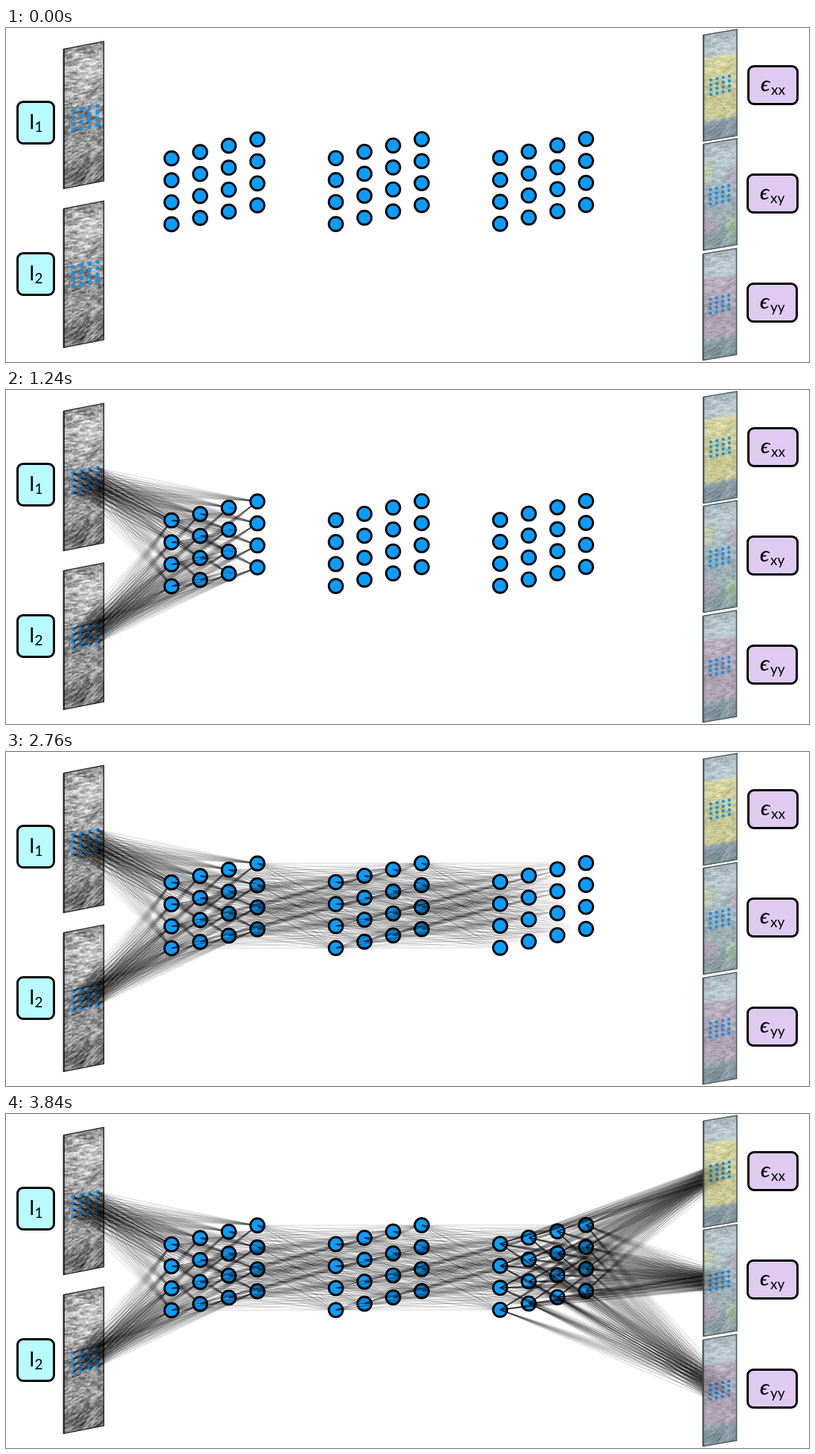
Recreate the animation shown at these times as an HTML page with a canvas. Size 1080 by 450 pixels, loop 3.88 s.

```html
<!DOCTYPE html>
<html lang="en">
<head>
<meta charset="utf-8">
<title>Strain network</title>
<style>
  html, body { margin: 0; width: 100%; height: 100%; overflow: hidden; background: #fff; }
  canvas, svg { position: absolute; left: 0; top: 0; width: 1080px; height: 450px; }
  rect { stroke: #000; stroke-width: 3; }
  .in { fill: #b8fbff; }
  .out { fill: #dfcbf2; }
  text { font-family: Lato, "Open Sans", sans-serif; fill: #000; }
  .big { font-size: 27px; }
  .sub { font-size: 19px; }
  .eps { font: italic 30px "Liberation Serif", "Noto Serif", "DejaVu Serif", serif; stroke: #000; stroke-width: .4; }
</style>
</head>
<body>
<canvas id="stage" width="1080" height="450"></canvas>
<svg id="labels" viewBox="0 0 1080 450"></svg>
<script>
const W = 1080, H = 450, LOOP = 3880, STEP = 40, PART = LOOP / 4, SOFT = 40;
const ctx = document.getElementById('stage').getContext('2d');

// Labels
function label(x, y, w, h, kind, parts) {
  const text = parts.map(([cls, dx, dy, s]) =>
    `<text class="${cls}" x="${x + dx}" y="${y + dy}">${s}</text>`).join('');
  return `<rect class="${kind}" x="${x}" y="${y}" width="${w}" height="${h}" rx="7.5"/>${text}`;
}
const inLabel = (y, n) => label(15.5, y, 49, 56, 'in', [['big', 15.5, 36.5, 'I'], ['sub', 23, 40.5, n]]);
const outLabel = (x, y, w, s) => label(x, y, w, 51, 'out', [['eps', 16.5, 33.5, 'ϵ'], ['sub', 30.5, 38, s]]);
document.getElementById('labels').innerHTML =
  inLabel(99.5, 1) + inLabel(303.5, 2) +
  outLabel(998.5, 51.5, 66, 'xx') + outLabel(997.5, 197.5, 67, 'xy') + outLabel(997.5, 344.5, 66, 'yy');

// 4 x 4 grid of points, column by column
function grid(x, y, dx, dy, slope) {
  const pts = [];
  for (let c = 0; c < 4; c++)
    for (let r = 0; r < 4; r++) pts.push({ x: x + c * dx, y: y + c * slope + r * dy });
  return pts;
}
const inputs = [grid(90.5, 112, 10.9, 8.6, -2.3), grid(90.5, 322, 10.9, 8.6, -2.3)];
const layers = [0, 1, 2].map(i => grid(222.6 + 221 * i, 175.6 - .3 * i, 38.5, 29.6, -8.5));
const outputs = [grid(948, 70, 8.3, 6.5, -1.7), grid(947.3, 217.8, 8.3, 6.5, -1.8), grid(947.3, 365.5, 8.3, 6.3, -1.8)];

// Seeded smooth noise
function hash(x, y, seed) {
  let h = Math.imul(x, 374761393) ^ Math.imul(y, 668265263) ^ Math.imul(seed, 974634721);
  h = Math.imul(h ^ (h >>> 13), 1274126177);
  return ((h ^ (h >>> 16)) >>> 0) / 4294967295;
}
function noise(x, y, seed) {
  const i = Math.floor(x), j = Math.floor(y);
  const ease = t => t * t * (3 - 2 * t), u = ease(x - i), v = ease(y - j);
  const mix = (a, b, t) => a + (b - a) * t;
  return mix(mix(hash(i, j, seed), hash(i + 1, j, seed), u),
             mix(hash(i, j + 1, seed), hash(i + 1, j + 1, seed), u), v);
}

// Layered tissue: brightness from top to bottom, streaks, fine grain
const tone = [145, 168, 182, 172, 176, 165, 140, 142, 135, 148, 150, 122, 118, 125];
function tissue(u, v, seed) {
  const p = v * (tone.length - 1), k = Math.min(Math.floor(p), tone.length - 2);
  const base = tone[k] + (tone[k + 1] - tone[k]) * (p - k);
  const x = u * 54, y = v * 190 + 3 * Math.sin(u * 4 + v * 9) + (v > .75 ? x * .6 : 0);
  return base + 95 * (noise(x / 8, y / 1.9, seed) - .5)
              + 95 * (noise(x / 2.4, y / 1.2, seed + 1) - .5)
              + 35 * (noise(x / 22, y / 8, seed + 2) - .5);
}

const teal = [168, 184, 190];
const deep = [142, 161, 168];
const blend = (a, b, t) => a.map((c, i) => c + (b[i] - c) * t);
const ramp = (a, b, v) => Math.max(0, Math.min(1, (v - a) / (b - a)));
const blob = (u, v, cu, cv) => Math.exp(-((u - cu) ** 2) / .06 - ((v - cv) ** 2) / .008);
const band = (col, a, b) => (u, v) =>
  blend(blend(teal, deep, ramp(.75, .9, v)), col, ramp(a, a + .03, v) * (1 - ramp(b, b + .03, v)));
function patches(u, v) {
  let c = blend(teal, deep, v * .6);
  c = blend(c, [196, 206, 140], .8 * blob(u, v, 0, .27));
  c = blend(c, [188, 152, 180], .7 * blob(u, v, 1, .35));
  c = blend(c, [185, 148, 176], .7 * blob(u, v, .1, .78));
  return blend(c, [158, 198, 142], .7 * blob(u, v, .9, .82));
}

function panel(g, x, y, w, h, rise, seed, tint) {
  const tile = document.createElement('canvas');
  tile.width = w; tile.height = h;
  const tg = tile.getContext('2d'), img = tg.createImageData(w, h);
  for (let j = 0; j < h; j++) for (let i = 0; i < w; i++) {
    const u = i / w, v = j / h, t = tissue(u, v, seed);
    const col = tint ? tint(u, v).map(c => c + (t - 150) * .4) : [t, t, t];
    img.data.set([...col, 255], (j * w + i) * 4);
  }
  tg.putImageData(img, 0, 0);
  g.save();
  g.transform(1, -rise / w, 0, 1, x, y);
  g.drawImage(tile, 0, 0);
  g.strokeStyle = tint ? '#4d565a' : '#1c1c1c';
  g.lineWidth = 1.4;
  g.strokeRect(0, 0, w, h);
  g.fillStyle = g.strokeStyle;
  g.fillRect(-.7, 0, 2, h);
  g.restore();
}

function dots(g, pts, r, line, edge) {
  g.fillStyle = '#0a9dff';
  g.strokeStyle = edge;
  g.lineWidth = line;
  for (const p of pts) {
    g.beginPath();
    g.arc(p.x, p.y, r, 0, 7);
    g.fill();
    g.stroke();
  }
}

function sheet() {
  const c = document.createElement('canvas');
  c.width = W; c.height = H;
  return c;
}

// Output panels veil the lines that run behind them
const veil = sheet(), vg = veil.getContext('2d');
panel(vg, 938, 9.5, 45, 143, 7.5, 3, band([200, 200, 148], .2, .8));
panel(vg, 938, 156.5, 45, 143, 7.5, 3, patches);
panel(vg, 937.5, 304.5, 45, 143, 7.5, 3, band([174, 163, 178], .22, .8));
outputs.forEach(pts => dots(vg, pts, 1.8, .6, '#0878d0'));

const base = sheet(), bg = base.getContext('2d');
bg.fillStyle = '#fff';
bg.fillRect(0, 0, W, H);
panel(bg, 77.5, 28.5, 54, 188, 10.5, 3, null);
panel(bg, 77.5, 243.5, 54, 187, 10.5, 3, null);
inputs.forEach(pts => dots(bg, pts, 2.4, .7, '#0878d0'));
bg.drawImage(veil, 0, 0);

// Each bundle meets at one dot and is wiped in from left to right
const bundle = (from, to) => {
  const xs = [...from, ...to].map(p => p.x);
  return { from, to, x0: Math.min(...xs), x1: Math.max(...xs) };
};
const fanIn = (from, layer) => layer.map(dot => bundle(from, [dot]));
const fanOut = (layer, to) => layer.map(dot => bundle([dot], to));
const parts = [
  inputs.flatMap(pts => fanIn(pts, layers[0])),
  fanIn(layers[0], layers[1]),
  fanIn(layers[1], layers[2]),
  outputs.flatMap(pts => fanOut(layers[2], pts))
];
const INK = 'rgba(0,0,0,.34)';

function drawBundle(b, p) {
  const lead = b.x0 + p * (b.x1 - b.x0 + SOFT);
  if (p < 1) {
    const fade = ctx.createLinearGradient(lead - SOFT, 0, lead, 0);
    fade.addColorStop(0, INK);
    fade.addColorStop(1, 'rgba(0,0,0,0)');
    ctx.strokeStyle = fade;
  } else ctx.strokeStyle = INK;
  for (const s of b.from) for (const e of b.to) {
    ctx.beginPath();
    ctx.moveTo(s.x, s.y);
    ctx.lineTo(e.x, e.y);
    ctx.stroke();
  }
}

function draw(t) {
  ctx.drawImage(base, 0, 0);
  parts.forEach((part, i) => {
    const p = Math.min(1, t / PART - i);
    ctx.lineWidth = .5;
    if (p > 0) part.forEach(b => drawBundle(b, p));
    if (layers[i]) dots(ctx, layers[i], 9.4, 2.9, '#000');
  });
  ctx.globalAlpha = .75;
  ctx.drawImage(veil, 0, 0);
  ctx.globalAlpha = 1;
}

let shown = -1;
function tick(now) {
  const t = Math.floor((now % LOOP) / STEP) * STEP;
  if (t !== shown) draw(shown = t);
  requestAnimationFrame(tick);
}
draw(0);
requestAnimationFrame(tick);
</script>
</body>
</html>
```
